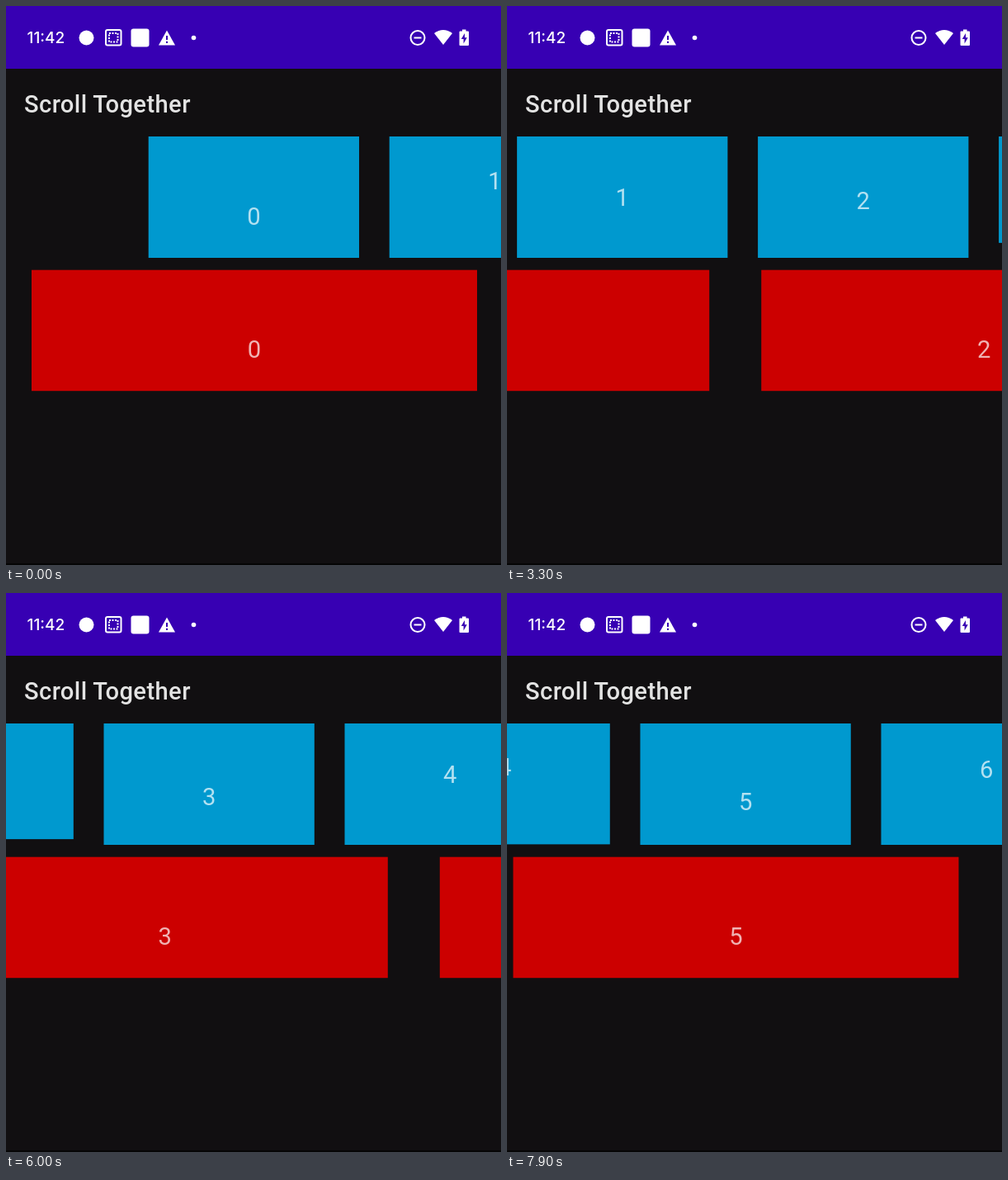
These frames come from a looping animation (600x677 px, 8000 ms). An HTML page:

```html
<!DOCTYPE html>
<html lang="en">
<head>
<meta charset="utf-8">
<title>Scroll Together</title>
<style>
  html, body { margin: 0; width: 100%; height: 100%; overflow: hidden; background: #110f11; }
  svg { display: block; width: 100vw; height: 100vh; }
  text { font: 29.17px Roboto, sans-serif; fill: #fff; }
  .title { font-weight: 500; letter-spacing: .0135em; fill: #e3e3e3; }
  .clock { font: 500 19px Inter, sans-serif; }
  .card text { text-anchor: middle; fill-opacity: .7; }
  .blue rect { fill: #0099cf; }
  .red rect { fill: #c00; }
  .line { fill: none; stroke: #fff; stroke-width: 2; }
</style>
</head>
<body>
<svg viewBox="0 0 600 677">
  <rect width="600" height="677" fill="#110f11"/>
  <rect y="675" width="600" height="2" fill="#050505"/>
  <rect width="600" height="76" fill="#3700b3"/>

  <g fill="#fff">
    <text class="clock" x="25.5" y="45.4">11:42</text>
    <circle cx="97.5" cy="38.5" r="9"/>
    <rect class="line" x="121" y="29" width="18.5" height="18.5" rx="2"/>
    <rect class="line" x="125" y="33" width="10.5" height="10.5" stroke-dasharray="2 1.5"/>
    <rect x="151.5" y="27.5" width="22" height="22" rx="3"/>
    <path d="M195 29.5 205 47.5H185Z"/>
    <path d="M194 36h2v5h-2zM194 42.7h2v2.2h-2z" fill="#3700b3"/>
    <circle cx="227.5" cy="38.5" r="2.8"/>
    <circle class="line" cx="499" cy="38.5" r="8.5"/>
    <path d="M494.5 37.5h9v2h-9z"/>
    <path d="M519 33Q530 25 541 33L530 47Z"/>
    <path d="M553 28.5h4.5v2h2.500q1 0 1 1v15.5q0 1-1 1h-9.5q-1 0-1-1v-15.5q0-1 1-1h2.5z"/>
    <path d="M556 33 551.8 40h2.8v5.5l4.2-7.2h-2.8z" fill="#3700b3"/>
  </g>
  <text class="title" x="22" y="129">Scroll Together</text>
  <g id="cards"></g>
</svg>
<script>
const NS = 'http://www.w3.org/2000/svg';
const LOOP = 8000, STEP = 100, LAG = 12;
// pitch: distance between cards; travel: scroll distance per page
const blue = { name: 'blue', x: 172.7, y: 158, w: 255.3, h: 147, pitch: 292, travel: 292 };
const red = { name: 'red', x: 31, y: 319.7, w: 540, h: 146.5, pitch: 603, travel: 603.5 };

// one finger swipe per page
const swipes = [
  { start: 850, release: 1300, at: .45, end: 2100 },
  { start: 2110, release: 3300, at: .55, end: 4000 },
  { start: 4110, release: 4900, at: .468, end: 5500 },
  { start: 5500, release: 6000, at: .1856, end: 7089 },
  { start: 7080, release: 7380, at: .45, end: 7660 },
  { start: 7650, release: 8300, at: .26, end: 9000 }
];

const progress = (t, a, b) => Math.min(1, Math.max(0, (t - a) / (b - a)));

// the drag accelerates up to the release, then the page settles
function swipe(t, { start, release, at, end }) {
  const drag = progress(t, start, release) ** 2;
  const settle = 1 - (1 - progress(t, release, end)) ** 2;
  return at * drag + (1 - at) * settle;
}

const page = t => swipes.reduce((sum, s) => sum + swipe(t, s), 0);

function add(parent, tag, attrs) {
  const el = document.createElementNS(NS, tag);
  for (const k in attrs) el.setAttribute(k, attrs[k]);
  return parent.appendChild(el);
}

function buildRow(row) {
  const root = document.getElementById('cards');
  row.cards = Array.from({ length: 8 }, (_, i) => {
    const g = add(root, 'g', { class: 'card ' + row.name });
    const rect = add(g, 'rect', { y: row.y, width: row.w, height: row.h });
    const label = add(g, 'text', { x: row.w / 2, y: 426.4 });
    label.textContent = i;
    return { g, rect, label };
  });
}

function slide(row, pos) {
  row.cards.forEach(({ g }, i) => {
    g.setAttribute('transform', `translate(${row.x + i * row.pitch - pos * row.travel} 0)`);
  });
}

// blue cards rise as they leave the centre; their top stays clipped
function lift(pos) {
  blue.cards.forEach(({ rect, label }, i) => {
    const rise = 42.5 * Math.abs(i - pos);
    label.setAttribute('y', 264.9 - rise);
    rect.setAttribute('height', Math.max(0, Math.min(blue.h, 190.5 - rise)));
  });
}

function draw(now) {
  const t = Math.floor((now + 5) % LOOP / STEP) * STEP;
  slide(blue, page(t));
  lift(page(t));
  slide(red, page(t - LAG));
}

buildRow(blue);
buildRow(red);
draw(0);
let start;
requestAnimationFrame(function tick(now) {
  start ??= now;
  draw(now - start);
  requestAnimationFrame(tick);
});
</script>
</body>
</html>
```
